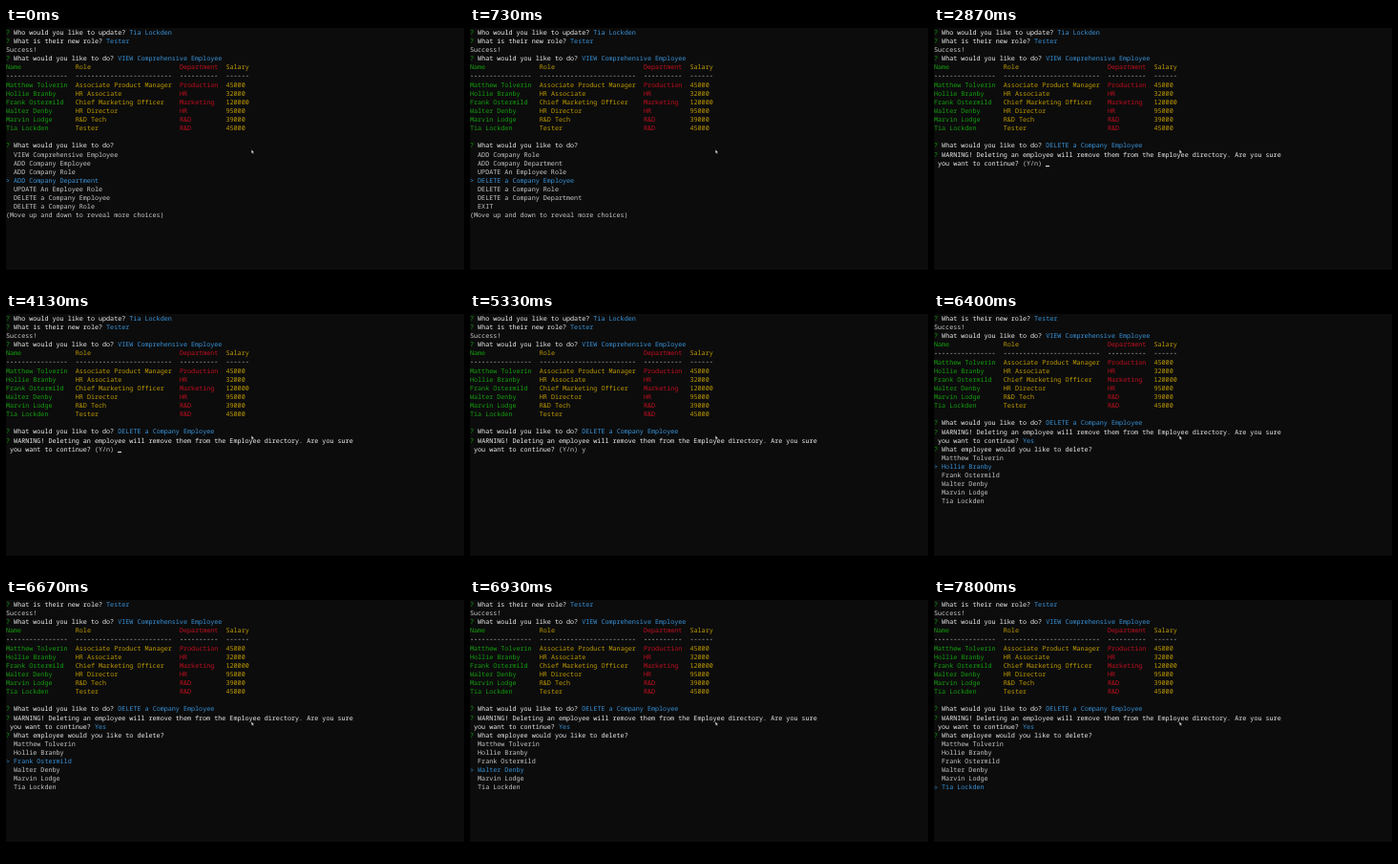
Write an HTML page that moves like this. It is 480x270 px and loops after 8 s.

```html
<!DOCTYPE html>
<html lang="en">
<head>
<meta charset="utf-8">
<title>Employee directory terminal</title>
<style>
  :root {
    --row: 9.11px;
    --col: 4.044px;
    --text: #cccccc;
    --bright: #f2f2f2;
    --green: #13a10e;
    --gold: #c19c00;
    --red: #c50f1f;
    --blue: #3a96dd;
  }
  html, body {
    margin: 0;
    width: 100%;
    height: 100%;
    overflow: hidden;
    background: #0c0c0c;
  }
  #screen {
    position: relative;
    width: 480px;
    height: 270px;
    overflow: hidden;
    background: linear-gradient(#0c0c0c 253px, #000 253px);
    color: var(--text);
    font: 6.74px/var(--row) "Noto Sans Mono", "DejaVu Sans Mono", monospace;
    font-variant-ligatures: none;
    text-rendering: geometricPrecision;
  }
  #page, .at { position: absolute; }
  .at {
    top: calc(var(--r) * var(--row));
    left: calc(var(--c, 0) * var(--col));
    white-space: pre;
  }
  pre, ul { margin: 0; padding: 0; font: inherit; list-style: none; }
  b { font-weight: 400; color: var(--bright); }
  b::before { content: "? "; color: var(--green); }
  i { font-style: normal; color: var(--text); }
  pre i { position: relative; top: -1px; }
  .green { color: var(--green); }
  .gold { color: var(--gold); }
  .red { color: var(--red); }
  .blue { color: var(--blue); }

  /* every change is a hard step on one shared 8 s clock */
  #page, .step { animation: 8s step-end infinite; }
  #page { animation-name: scroll; }
  @keyframes scroll { 67.5%, 100% { transform: translateY(calc(var(--row) * -1)); } }

  /* main menu */
  #menu { animation-name: until-enter; }
  #window { height: calc(var(--row) * 7); overflow: hidden; }
  #strip { animation-name: strip; }
  #dept { animation-name: dept; }
  #update { animation-name: update; }
  #remove { animation-name: remove; }
  @keyframes until-enter { 0% { opacity: 1; } 35.875%, 100% { opacity: 0; } }
  @keyframes strip {
    0% { transform: none; }
    3.375% { transform: translateY(calc(var(--row) * -1)); }
    6.625%, 100% { transform: translateY(calc(var(--row) * -2)); }
  }
  @keyframes dept { 0% { color: var(--blue); } 3.375%, 100% { color: var(--text); } }
  @keyframes update { 3.375% { color: var(--blue); } 6.625%, 100% { color: var(--text); } }
  @keyframes remove { 6.625%, 100% { color: var(--blue); } }

  /* confirmation */
  #confirm { opacity: 0; animation-name: after-enter; }
  @keyframes after-enter { 35.875%, 100% { opacity: 1; } }
  #caret {
    top: 143.9px;
    left: calc(29 * var(--col));
    width: var(--col);
    height: 1.4px;
    background: var(--bright);
    opacity: 0;
    animation-name: blink;
  }
  @keyframes blink {
    0% { opacity: 0; }
    35.875% { opacity: 1; }
    44.125% { opacity: 0; }
    50.875% { opacity: 1; }
    57.5% { opacity: 0; }
    59.125% { opacity: 1; transform: translateX(var(--col)); }
    64.125%, 100% { opacity: 0; }
  }
  #key { opacity: 0; animation-name: key; }
  @keyframes key { 59.125% { opacity: 1; } 67.5%, 100% { opacity: 0; } }

  /* employee list: one row down every 260 ms from 6400 ms */
  .late { opacity: 0; animation-name: late; }
  @keyframes late { 67.5%, 100% { opacity: 1; } }
  #pointer { animation-name: pointer; }
  @keyframes pointer {
    0% { transform: none; }
    80% { transform: translateY(var(--row)); }
    83.25% { transform: translateY(calc(var(--row) * 2)); }
    86.5% { transform: translateY(calc(var(--row) * 3)); }
    89.75% { transform: translateY(calc(var(--row) * 4)); }
    93%, 100% { transform: translateY(calc(var(--row) * 5)); }
  }
  #first { animation-name: first; }
  #last { animation-name: last; }
  .pass { animation-name: pass; animation-delay: calc(var(--n) * 260ms - 1600ms); }
  @keyframes first { 0% { color: var(--blue); } 80%, 100% { color: var(--text); } }
  @keyframes pass { 0% { color: var(--blue); } 3.25%, 100% { color: var(--text); } }
  @keyframes last { 93%, 100% { color: var(--blue); } }

  #mouse { position: absolute; left: 256px; top: 126px; }
</style>
</head>
<body>
<div id="screen">
  <div id="page">
    <div class="at" style="--r:0"><b>Who would you like to update?</b> <span class="blue">Tia Lockden</span></div>
    <div class="at" style="--r:1"><b>What is their new role?</b> <span class="blue">Tester</span></div>
    <div class="at" style="--r:2">Success!</div>
    <div class="at" style="--r:3"><b>What would you like to do?</b> <span class="blue">VIEW Comprehensive Employee</span></div>

<pre class="at green" style="--r:4">Name
<i>----------------</i>
Matthew Tolverin
Hollie Branby
Frank Ostermild
Walter Denby
Marvin Lodge
Tia Lockden</pre>
<pre class="at gold" style="--r:4;--c:18">Role
<i>-------------------------</i>
Associate Product Manager
HR Associate
Chief Marketing Officer
HR Director
R&amp;D Tech
Tester</pre>
<pre class="at red" style="--r:4;--c:45">Department
<i>----------</i>
Production
HR
Marketing
HR
R&amp;D
R&amp;D</pre>
<pre class="at gold" style="--r:4;--c:57">Salary
<i>------</i>
45000
32000
120000
95000
39000
45000</pre>

    <div class="at" style="--r:13"><b>What would you like to do?</b></div>

    <div id="menu" class="step">
      <div id="window" class="at" style="--r:14;--c:2"><ul id="strip" class="step"
        ><li>VIEW Comprehensive Employee</li
        ><li>ADD Company Employee</li
        ><li>ADD Company Role</li
        ><li id="dept" class="step">ADD Company Department</li
        ><li id="update" class="step">UPDATE An Employee Role</li
        ><li id="remove" class="step">DELETE a Company Employee</li
        ><li>DELETE a Company Role</li
        ><li>DELETE a Company Department</li
        ><li>EXIT</li></ul></div>
      <div class="at blue" style="--r:17">&gt;</div>
      <div class="at" style="--r:21">(Move up and down to reveal more choices)</div>
    </div>

    <div id="confirm" class="step">
      <div class="at blue" style="--r:13;--c:29">DELETE a Company Employee</div>
      <div class="at" style="--r:14"><b>WARNING! Deleting an employee will remove them from the Employee directory. Are you sure</b></div>
      <div class="at" style="--r:15;--c:1;color:var(--bright)">you want to continue? <i>(Y/n)</i></div>
      <div id="key" class="at step" style="--r:15;--c:29">y</div>
      <div id="caret" class="at step"></div>
    </div>

    <div class="late step">
      <!-- the answer replaces the (Y/n) hint -->
      <div class="at" style="--r:15;--c:23;background:#0c0c0c"><span class="blue">Yes</span>   </div>
      <div class="at" style="--r:16"><b>What employee would you like to delete?</b></div>
      <div id="pointer" class="at blue step" style="--r:17">&gt;</div>
      <ul class="at" style="--r:17;--c:2"
        ><li id="first" class="step">Matthew Tolverin</li
        ><li class="step pass" style="--n:0">Hollie Branby</li
        ><li class="step pass" style="--n:1">Frank Ostermild</li
        ><li class="step pass" style="--n:2">Walter Denby</li
        ><li class="step pass" style="--n:3">Marvin Lodge</li
        ><li id="last" class="step">Tia Lockden</li></ul>
    </div>
  </div>

  <svg id="mouse" width="6" height="8" viewBox="0 0 6 8">
    <path d="M1.2 1.2V5.2L2.2 4.5L2.9 5.8L3.5 5.5L2.9 4.2H4.2Z" fill="#e4e4e4" stroke="#000" stroke-width=".3"/>
  </svg>
</div>
</body>
</html>
```
